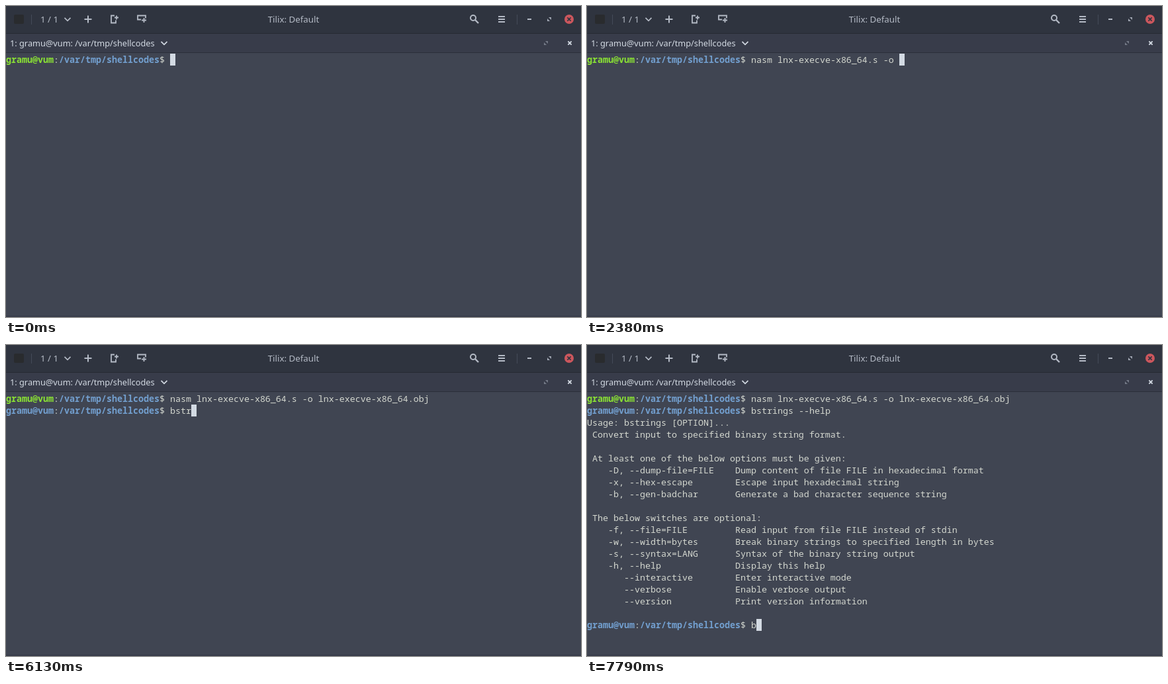
An HTML page for the animation above (8000 ms loop, 869 by 470 pixels).

```html
<!DOCTYPE html>
<html lang="en">
<head>
<meta charset="utf-8">
<title>Terminal session</title>
<style>
  html, body { margin: 0; width: 100%; height: 100%; overflow: hidden; background: #404552; }
  #stage { position: relative; width: 869px; height: 470px; overflow: hidden; }
  #stage svg { position: absolute; left: 0; top: 0; }
  .ui { font-family: "Noto Sans", sans-serif; font-size: 13.333px; fill: #b4bac5; }
  .tab { font-size: 12.75px; fill: #d3dae3; }
  #screen {
    position: absolute; left: 0; top: 72px; margin: 0;
    font: 13.333px/18px "Noto Sans Mono", monospace;
    font-variant-ligatures: none; color: #d3d7cf;
  }
  #screen b { color: #8ae234; }
  #screen b + b { color: #729fcf; }
  #cursor { position: absolute; width: 8px; height: 18px; background: #d3dae3; }
</style>
</head>
<body>
<div id="stage">
  <svg width="869" height="470" fill="none" stroke="#b4bac5" stroke-width="2">
    <defs>
      <path id="chevron" d="M-4.5 -2.2 L0 2.3 L4.5 -2.2" stroke-width="1.7"/>
      <path id="expand" d="M-1 -3H3V1ZM-3 -1V3H1Z" stroke="none"/>
      <path id="cross" d="M-2.6 -2.6L2.6 2.6M2.6 -2.6L-2.6 2.6"/>
    </defs>
    <g stroke="none">
      <rect width="869" height="41" fill="#2f343f"/>
      <rect y="41" width="869" height="1" fill="#262a33"/>
      <rect y="42" width="869" height="28" fill="#383c4a"/>
      <rect y="70" width="869" height="1" fill="#2b2e39"/>
      <rect y="468" width="869" height="2" fill="#383c4a"/>
      <rect x="12" y="13" width="15" height="14" rx="2" fill="#292b2e"/>
      <path d="M38 13h1v15h-1zM772 13h1v15h-1z" fill="#444a58"/>
      <text class="ui" x="52" y="25">1 / 1</text>
      <text class="ui" x="434.5" y="25" text-anchor="middle">Tilix: Default</text>
      <text class="ui tab" x="6" y="61">1: gramu@vum: /var/tmp/shellcodes</text>
    </g>
    <use href="#chevron" x="93" y="20"/>
    <path d="M118.5 20h11M124 14.5v11"/>
    <path d="M164 14.5h-5v11h7v-4M164 17.5h6M167 14.5v6" stroke-width="1.8"/>
    <path d="M204 20.5h-5v-6h12v4M205 21.5h7M208.5 18v7" stroke-width="1.8"/>
    <circle cx="706" cy="18" r="4"/>
    <path d="M709 21l5 5" stroke-width="2.4"/>
    <path d="M744 16h10M744 20h10M744 24h10M788 20h6"/>
    <use href="#expand" x="821" y="20" fill="#a0a6b2"/>
    <circle cx="851" cy="20" r="7" fill="#cc575d" stroke="none"/>
    <use href="#cross" x="851" y="20" stroke="#2f343f" stroke-width="1.6"/>
    <use href="#chevron" x="239" y="56" stroke="#d3dae3"/>
    <use href="#expand" x="816" y="56" fill="#747a87"/>
    <use href="#cross" x="852" y="56" stroke="#d3dae3" stroke-width="1.9"/>
  </svg>
  <pre id="screen"></pre>
  <div id="cursor"></div>
</div>
<script>
const LOOP = 8000, CELL = 8, ROW = 18, TOP = 72;
const PROMPT_COLUMNS = 31;
const prompt = '<b>gramu@vum</b>:<b>/var/tmp/shellcodes</b>$ ';
const source = 'nasm lnx-execve-x86_64.s';
const assemble = source + ' -o lnx-execve-x86_64';
const afterNasm = prompt + assemble + '.obj\n';
const option = (indent, flag, text) => (' '.repeat(indent) + flag).padEnd(28) + text;
const help = [
  'Usage: bstrings [OPTION]...',
  ' Convert input to specified binary string format.',
  '',
  ' At least one of the below options must be given:',
  option(4, '-D, --dump-file=FILE', 'Dump content of file FILE in hexadecimal format'),
  option(4, '-x, --hex-escape', 'Escape input hexadecimal string'),
  option(4, '-b, --gen-badchar', 'Generate a bad character sequence string'),
  '',
  ' The below switches are optional:',
  option(4, '-f, --file=FILE', 'Read input from file FILE instead of stdin'),
  option(4, '-w, --width=bytes', 'Break binary strings to specified length in bytes'),
  option(4, '-s, --syntax=LANG', 'Syntax of the binary string output'),
  option(4, '-h, --help', 'Display this help'),
  option(7, '--interactive', 'Enter interactive mode'),
  option(7, '--verbose', 'Enable verbose output'),
  option(7, '--version', 'Print version information'),
  '', ''
].join('\n');
const afterHelp = afterNasm + prompt + 'bstrings --help\n' + help;

// Each session: text above the prompt, then [start ms, typed input, cursor hidden].
const sessions = [
  ['', [
    [0, ''], [420, '', true], [460, 'n'], [670, 'nas'], [920, 'nasm '], [1080, 'nasm l'],
    [1380, source + ' '], [1920, source + ' ', true], [2000, source + ' -', true],
    [2080, source + ' -'], [2380, source + ' -o '], [2830, source + ' -o ', true],
    [2960, assemble + '.s '], [3540, assemble + '.s'], [3750, assemble + '.o'],
    [3960, assemble + '.ob'], [4460, assemble + '.obj']
  ]],
  [afterNasm, [
    [4960, ''], [5460, '', true], [5580, 'b'], [5960, 'bs'], [6130, 'bstr'],
    [6380, 'bstrings -'], [6540, 'bstrings --'], [6790, 'bstrings --he'], [6960, 'bstrings --hel']
  ]],
  [afterHelp, [[7080, ''], [7670, '', true], [7790, 'b']]]
];
const steps = sessions.flatMap(([history, inputs]) =>
  inputs.map(([start, input, hidden]) => ({ history, start, input, hidden })));

const screenEl = document.getElementById('screen');
const cursorEl = document.getElementById('cursor');
let shown;

function draw(now) {
  const time = now % LOOP;
  const step = steps.findLast(s => s.start <= time);
  if (step !== shown) {
    shown = step;
    screenEl.innerHTML = step.history + prompt + step.input;
    const row = step.history.split('\n').length - 1;
    cursorEl.style.left = (PROMPT_COLUMNS + step.input.length) * CELL + 'px';
    cursorEl.style.top = TOP + row * ROW + 'px';
    cursorEl.style.visibility = step.hidden ? 'hidden' : 'visible';
  }
}

const origin = performance.now();
function tick() {
  draw(performance.now() - origin);
  requestAnimationFrame(tick);
}
tick();
</script>
</body>
</html>
```
